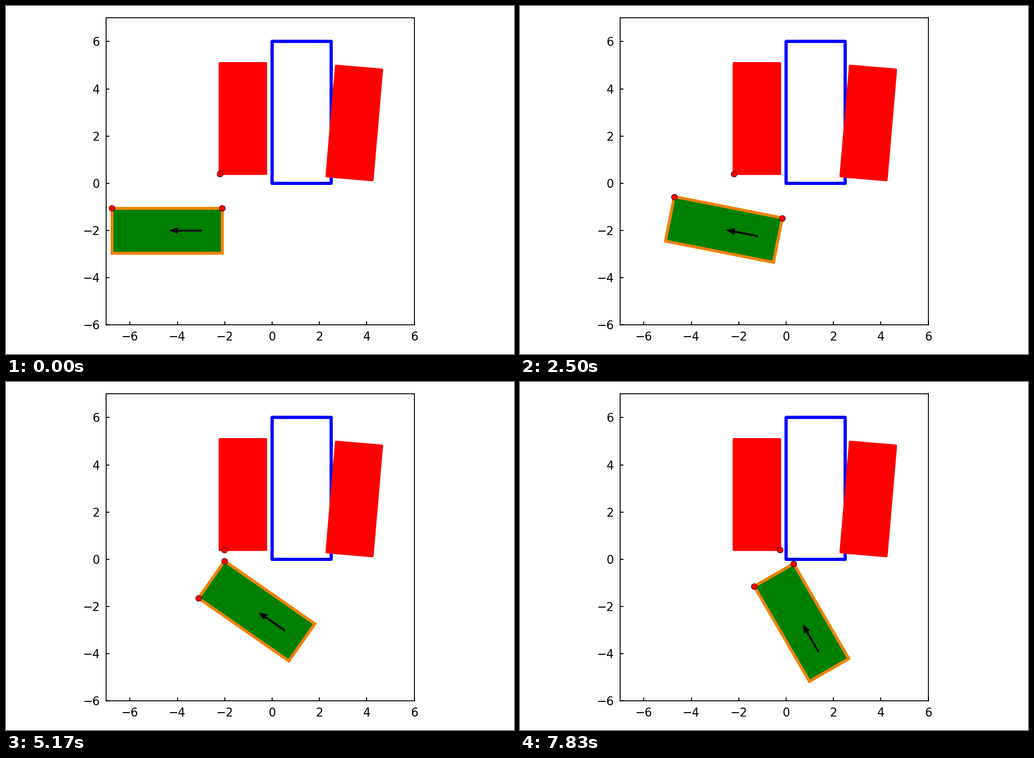
A matplotlib script that plays this animation: 903x620 px, repeating every 8 s.

```python
import numpy as np
import matplotlib.pyplot as plt
from matplotlib.animation import FuncAnimation
from matplotlib.patches import FancyArrow, Polygon

W, H, DPI = 903, 620, 128
PT = 72 / DPI                      # points per pixel
STEPS = 48                         # poses of the car in one loop
FRAMES, INTERVAL = 160, 50         # ten frames span three poses
LENGTH, WIDTH, REAR = 4.65, 1.92, 0.89
WALL_LEFT, WALL_RIGHT, WALL_Y = -2.2, -0.26, 0.4
SPEED = 0.1202

plt.rcParams.update({
    "font.family": "DejaVu Sans",
    "font.size": 20.83 * PT,
    "axes.linewidth": 1.67 * PT,
})


def bump(t, centre, width):
    return np.exp(-((t - centre) / width) ** 2)


def heading(t):
    """Angle of the car: a tightening turn with one steering correction."""
    wiggle = 2.9 * (t - 13) * bump(t, 13, 2.8)
    return np.radians(0.838 * t + 0.0093 * t ** 2 - wiggle)


def drive():
    """Rear axle positions, reversing along the heading and slowing once."""
    mid = np.arange(STEPS - 1) + 0.5
    dist = SPEED * (1 - 0.83 * bump(mid, 39, 3.8))
    a = heading(mid)
    moves = np.column_stack((dist * np.cos(a), -dist * np.sin(a)))
    return np.vstack(([0, 0], np.cumsum(moves, axis=0))) + (-3, -2)


def box(cx, cy, w, h, angle=0):
    """Corners of a rectangle turned about its centre."""
    a = np.radians(angle)
    pts = np.array([(-w, -h), (w, -h), (w, h), (-w, h)]) / 2
    rot = np.array([(np.cos(a), np.sin(a)), (-np.sin(a), np.cos(a))])
    return pts @ rot + (cx, cy)


fig = plt.figure(figsize=(W / DPI, H / DPI), dpi=DPI, facecolor="white")
left, right, bottom, top = 178.2, 725.6, 568.4, 21.4
ax = fig.add_axes([left / W, 1 - bottom / H,
                   (right - left) / W, (bottom - top) / H])
ax.set(xlim=(-7, 6), ylim=(-6, 7),
       xticks=range(-6, 7, 2), yticks=range(-6, 7, 2))
ax.tick_params(direction="in", length=6.25 * PT, width=1.67 * PT,
               pad=11.2 * PT)

ax.add_patch(Polygon(box(1.25, 3, 2.5, 6), fill=False, edgecolor="blue",
                     linewidth=5.7 * PT, joinstyle="round", zorder=2))
for cx, cy, angle in ((-1.23, 2.75, 0), (3.47, 2.556, -4.9)):
    ax.add_patch(Polygon(box(cx, cy, 1.94, 4.69, angle), facecolor="red",
                         edgecolor="red", linewidth=4.17 * PT,
                         joinstyle="round", zorder=3))

car = Polygon(box(0, 0, LENGTH, WIDTH), facecolor="green",
              edgecolor="#f08205", linewidth=5.2 * PT,
              joinstyle="miter", zorder=4)
ax.add_patch(car)
arrow = FancyArrow(0, 0, 1, 0, width=0.03, head_width=0.2, head_length=0.3,
                   color="black", linewidth=2.08 * PT, zorder=5)
ax.add_patch(arrow)
dots, = ax.plot([], [], "o", color="red", markersize=10.6 * PT,
                markeredgecolor="black", markeredgewidth=0.75 * PT, zorder=6)

path = drive()


def draw(n):
    step = (3 * n + 2) // 10
    axle, a = path[step], heading(step)
    ahead = np.array((-np.cos(a), np.sin(a)))
    side = np.array((np.sin(a), np.cos(a))) * WIDTH / 2
    nose, tail = axle + (LENGTH - REAR) * ahead, axle - REAR * ahead

    near = nose + side
    # The facing edge changes once the near corner passes the wall's end.
    other = nose - side if near[0] > WALL_LEFT else tail + side
    wall = (np.clip(near[0], WALL_LEFT, WALL_RIGHT), WALL_Y)

    car.set_xy([near, nose - side, tail - side, tail + side])
    arrow.set_data(x=axle[0], y=axle[1], dx=ahead[0], dy=ahead[1])
    dots.set_data(*zip(near, other, wall))
    return car, arrow, dots


anim = FuncAnimation(fig, draw, frames=FRAMES, interval=INTERVAL,
                     init_func=lambda: draw(0), repeat=True, repeat_delay=0)
plt.show()
```
